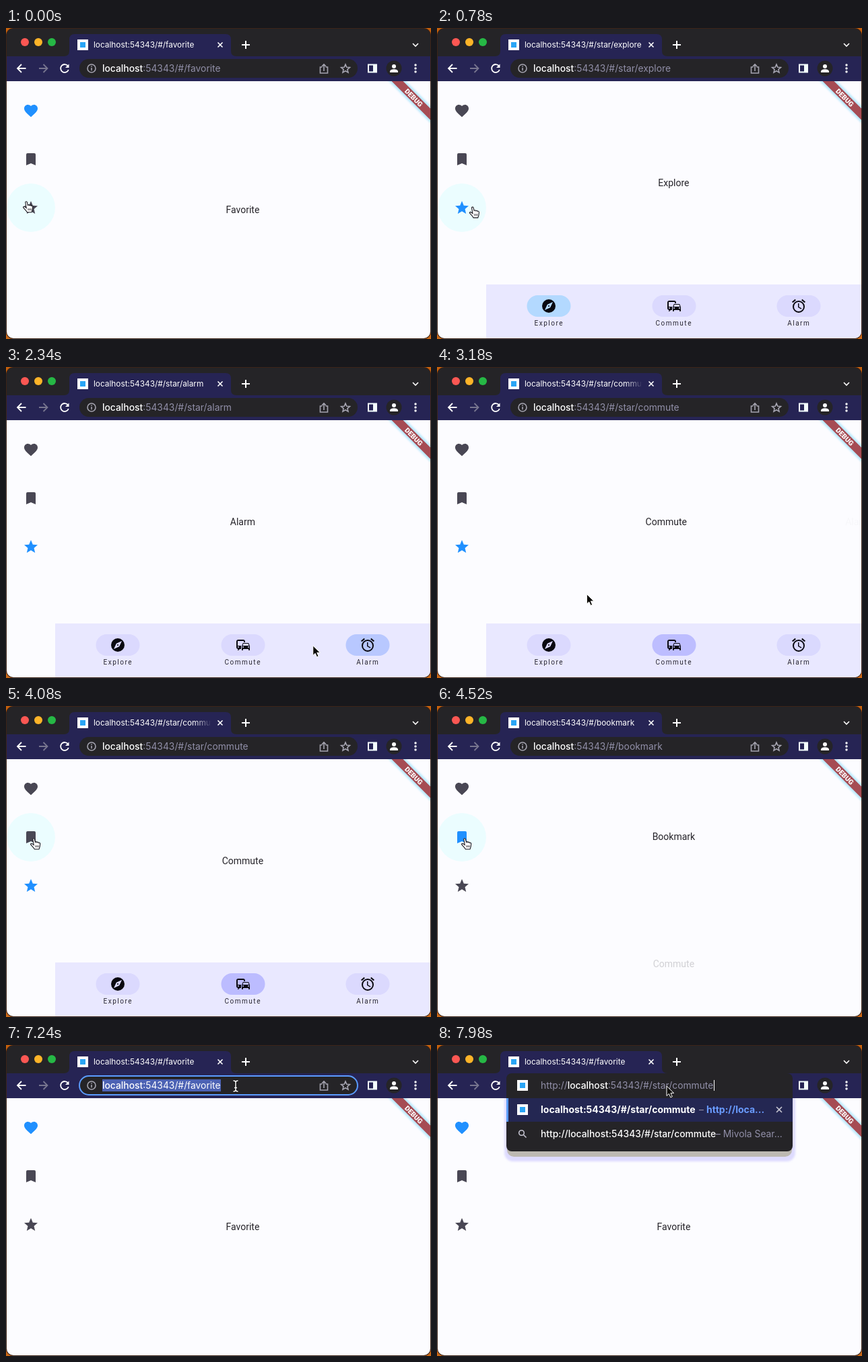
An HTML page for the animation above (8 s loop, 631 by 462 pixels).

```html
<!DOCTYPE html>
<html lang="en">
<head>
<meta charset="utf-8">
<title>Nested navigation</title>
<style>
  html, body { margin: 0; width: 100%; height: 100%; overflow: hidden; background: #252427; }
  svg { display: block; width: 100vw; height: 100vh; }
  text { white-space: pre; }
  .ui { font-family: Inter, "Open Sans", sans-serif; font-size: 13.85px; }
  .bold { font-size: 14px; font-weight: 700; }
  .mid { font-weight: 500; }
  .page { font: 14px Roboto, sans-serif; fill: #26242a; text-anchor: middle; }
  .label { font: 10px Roboto, sans-serif; letter-spacing: 1.5px; fill: #2a2832; }
  .line { fill: none; stroke-width: 1.6; }
  .dim { fill: #918fa8; }
  .hi { fill: #fff; }
</style>
</head>
<body>
<svg viewBox="0 0 631 462" preserveAspectRatio="none">
  <defs>
    <linearGradient id="desk" x2="0" y2="1">
      <stop offset="0" stop-color="#c4600c"/><stop offset=".5" stop-color="#7a3a10"/>
      <stop offset=".84" stop-color="#8a1414"/><stop offset="1" stop-color="#cc6a16"/>
    </linearGradient>
    <linearGradient id="fade">
      <stop offset="0" stop-color="#262454" stop-opacity="0"/><stop offset="1" stop-color="#262454"/>
    </linearGradient>
    <filter id="soft" x="-20%" y="-20%" width="140%" height="140%"><feGaussianBlur stdDeviation="1.8"/></filter>
    <clipPath id="win"><rect x="1" y="1" width="629" height="460" rx="10"/></clipPath>
    <clipPath id="content"><rect y="79" width="631" height="383"/></clipPath>
    <clipPath id="body"><rect x="73" y="79" width="557" height="382"/></clipPath>
    <clipPath id="titleClip"><rect x="126" y="12" width="179" height="26"/></clipPath>
    <g id="favicon"><rect width="16" height="16" fill="#fff"/><rect x="4" y="4" width="8" height="8" fill="#2aa5f5"/></g>
    <path id="beamShape" d="M-3.500-8Q0-8 0-5.500V5.500Q0 8-3.500 8M3.500-8Q0-8 0-5.500M3.500 8Q0 8 0 5.500M-2 2.500H2"/>
  </defs>

  <rect width="631" height="462" fill="url(#desk)"/>
  <rect width="631" height="462" rx="11" fill="#3b2216"/>
  <g clip-path="url(#win)">
    <rect width="631" height="80" fill="#252427"/>
    <path d="M86 42q8 0 8-8V17q0-8 8-8H326q8 0 8 8V34q0 8 8 8z" fill="#262454"/>
    <rect y="42" width="631" height="37" fill="#262454"/>
    <rect y="79" width="631" height="383" fill="#fcfcff"/>

    <circle cx="28" cy="21" r="6" fill="#fc5753"/>
    <circle cx="48" cy="21" r="6" fill="#fdb428"/>
    <circle cx="68" cy="21" r="6" fill="#26b845"/>
    <use href="#favicon" x="106" y="17"/>
    <g clip-path="url(#titleClip)">
      <text id="title" class="ui hi" x="130" y="29.3" style="font-size:11.85px"/>
      <rect id="titleFade" x="280" y="14" width="25" height="22" fill="url(#fade)"/>
    </g>
    <g class="line" stroke="#fff">
      <path d="M314.500 21.500l7 7m0-7l-7 7"/>
      <path d="M350 25h12M356 19v12" stroke-width="2"/>
      <path d="M604 23l4 4 4-4"/>
      <path d="M29.500 60H17.500M23 54l-6 6 6 6" stroke-width="1.8"/>
      <path d="M49 60h12M55.500 54l6 6-6 6" stroke="#77758f" stroke-width="1.8"/>
      <path d="M92 56.500A6 6 0 1 0 92.800 62" stroke-width="1.8"/>
    </g>
    <path d="M93.500 53.500v5.500h-5.500z" fill="#fff"/>

    <rect id="omnibox" x="109" y="46" width="413" height="28" rx="14" fill="#252427" stroke="#5b9cff" stroke-width="2"/>
    <g class="line" stroke="#a5a4b0" stroke-width="1.4">
      <circle cx="127" cy="60" r="6"/>
      <path d="M127 59v4.200M127 56.300v1.500"/>
      <path d="M469.500 58h-3v9h11v-9h-3M472 64V54M469 57l3-3 3 3"/>
      <path d="M504 54l1.800 4.200 4.600.4-3.500 3 1.100 4.500-4-2.400-4 2.400 1.100-4.500-3.500-3 4.600-.4z"/>
    </g>
    <rect id="selection" x="143" y="51" width="176" height="18" fill="#4c62b4"/>
    <text class="ui" x="143" y="65"><tspan class="hi mid">localhost</tspan><tspan id="path"/></text>

    <path d="M537 53.500h14v13h-14zM539 55.500v9h6v-9z" fill="#f4ffff" fill-rule="evenodd"/>
    <circle cx="576" cy="60" r="11.500" fill="#252427"/>
    <circle cx="576" cy="57" r="3" fill="#fff"/>
    <path d="M570 66v-1.500c0-4.500 12-4.500 12 0V66z" fill="#fff"/>
    <g fill="#fff"><circle cx="608" cy="55" r="1.700"/><circle cx="608" cy="60" r="1.700"/><circle cx="608" cy="65" r="1.700"/></g>

    <circle id="hover" cx="37" r="36" fill="#ebfdff"/>
    <circle id="ripple" cx="37" fill="#e2f0ff"/>
    <g id="rail"/>
    <g clip-path="url(#body)">
      <g id="nav"><rect x="73" y="381" width="558" height="81" fill="#e9e8ff"/></g>
      <text id="oldText" class="page"/>
      <text id="newText" class="page"/>
    </g>

    <g clip-path="url(#content)">
      <g transform="translate(605.500 103.500) rotate(45)">
        <rect x="-60" y="-9" width="120" height="18" fill="#b9e9ff" filter="url(#soft)"/>
        <rect x="-60" y="-6" width="120" height="12" fill="#a64c54"/>
        <text y="3.700" text-anchor="middle" fill="#fff" style="font:900 10.2px Roboto,sans-serif">DEBUG</text>
      </g>
    </g>

    <g id="suggest">
      <g clip-path="url(#content)">
        <rect x="100" y="70" width="432" height="103" rx="13" fill="#dedbff" filter="url(#soft)"/>
        <rect x="104" y="90" width="423" height="76" rx="10" fill="#bdb9b2"/>
      </g>
      <rect x="103" y="42" width="425" height="116" rx="8" fill="#252427"/>
      <rect x="103" y="79" width="425" height="35" fill="#242752"/>
      <rect x="103" y="79" width="3" height="35" fill="#5b9cff"/>
      <use href="#favicon" x="119" y="52"/>
      <use href="#favicon" x="119" y="88"/>
      <g class="line" stroke="#c4c3cf">
        <path d="M504 92l8 8m0-8l-8 8"/>
        <circle cx="125.500" cy="130.500" r="3.800"/><path d="M128.500 133.500l4 4"/>
      </g>
      <text class="ui dim" x="154" y="65">http://<tspan class="hi mid">localhost</tspan>:54343/#/star/commute</text>
      <rect x="411" y="52" width="1" height="16" fill="#fff"/>
      <text class="ui bold hi" x="154" y="101">localhost:54343/#/star/commute</text>
      <text class="ui dim" x="389" y="101">–</text>
      <text class="ui bold" x="400" y="101" fill="#6a9cff">http://loca...</text>
      <text class="ui mid hi" x="154" y="137">http://localhost:54343/#/star/commute</text>
      <text class="ui dim" x="414" y="137">– Mivola Sear...</text>
    </g>
  </g>

  <path id="arrow" d="M0 0V14.500L3.400 11.400 5.800 16.800 8.300 15.700 6 10.400H10.600z" fill="#0c0b08" stroke="#fff"/>
  <g id="hand" stroke="#1a1820">
    <path d="M-1.200 1C-1.200-.6 1.200-.6 1.400 1L2.400 5.200C3 4.200 4.800 4.500 5 5.600 5.800 4.800 7.200 5.200 7.400 6.300 8.400 5.700 9.800 6.400 9.700 7.800L9.200 12 8 15.800H1.400C0 12.800-2.800 10.800-4.400 8.600-4.600 7.200-2.600 6.800-1.400 8.200L.2 9.400z" fill="#fff" stroke-width="1.100"/>
    <path d="M3 10v3M5 10v3M7 10v3" stroke-width=".8"/>
  </g>
  <g id="beam" fill="none">
    <use href="#beamShape" stroke="#111" stroke-width="3.400"/>
    <use href="#beamShape" stroke="#fff" stroke-width="1.500"/>
  </g>
</svg>
<script>
const LOOP = 8000, SLIDE = 300, W = 558, H = 382, MID = 351.4;
const FOCUS = 6900, PASTE = 7700;
const $ = id => document.getElementById(id);
const clamp = (v, a = 0, b = 1) => Math.min(b, Math.max(a, v));
const set = (el, attrs) => { for (const k in attrs) el.setAttribute(k, attrs[k]); };
const show = (el, on) => { el.style.display = on ? '' : 'none'; };

function add(parent, tag, attrs) {
  const el = document.createElementNS('http://www.w3.org/2000/svg', tag);
  set(el, attrs);
  return parent.appendChild(el);
}

const railIcons = [
  'M12 21.35l-1.45-1.32C5.4 15.36 2 12.28 2 8.5 2 5.42 4.42 3 7.5 3c1.74 0 3.41.81 4.5 2.09C13.09 3.81 14.76 3 16.5 3 19.58 3 22 5.42 22 8.5c0 3.78-3.4 6.86-8.55 11.54z',
  'M17 3H7a2 2 0 0 0-2 2V21l7-3 7 3V5a2 2 0 0 0-2-2z',
  'M12 17.27L18.18 21l-1.64-7.03L22 9.24l-7.19-.61L12 2 9.19 8.63 2 9.24l5.46 4.73L5.82 21z'
];
const wheel = x => `M${x} 14a1 1 0 1 0 0 2a1 1 0 1 0 0-2z`;
const navItems = [
  { name: 'Explore', x: 166, label: 144.6, on: [179, 217, 255],
    icon: 'M12 10.9a1.1 1.1 0 1 0 0 2.2a1.1 1.1 0 1 0 0-2.2zM12 2a10 10 0 1 0 0 20a10 10 0 1 0 0-20zM14.19 14.19L6 18l3.81-8.19L18 6z' },
  { name: 'Commute', x: 352, label: 324.6, on: [188, 188, 255],
    icon: 'M13 8h2V7a3 3 0 0 0-3-3H5a3 3 0 0 0-3 3v8a3 3 0 0 0 3 3l-1 1v1h1l2-2h2v-5H4V6h9z' + wheel(5) +
      'M11.4 9.7a1 1 0 0 1 1-.7h7.2a1 1 0 0 1 1 .7L22 13.8v5.5a.7.7 0 0 1-.7.7h-.6a.7.7 0 0 1-.7-.7V18h-8v1.3a.7.7 0 0 1-.7.7h-.6a.7.7 0 0 1-.7-.7v-5.5zM12.4 10l-1 3h9.2l-1-3z' + wheel(12) + wheel(20) },
  { name: 'Alarm', x: 537, label: 520.2, on: [184, 200, 255],
    icon: 'M22 5.72l-4.6-3.86-1.29 1.53 4.6 3.86zM7.88 3.39L6.6 1.86 2 5.71l1.29 1.53zM12.5 8H11v6l4.75 2.85.75-1.23-4-2.37zM12 4a9 9 0 1 0 0 18a9 9 0 1 0 0-18zM12 6a7 7 0 1 1 0 14a7 7 0 1 1 0-14z' }
];
const pillOff = [219, 217, 254];

const railY = i => 123 + 72 * i;
const rail = railIcons.map((d, i) => add($('rail'), 'path', { d, transform: `translate(25 ${railY(i) - 12})` }));
const pills = navItems.map(item => {
  const pill = add($('nav'), 'rect', { x: item.x - 32.5, y: 397, width: 65, height: 32, rx: 16 });
  add($('nav'), 'path', { d: item.icon, 'fill-rule': 'evenodd', fill: '#0a0910', transform: `translate(${item.x - 12} 401)` });
  add($('nav'), 'text', { class: 'label', x: item.label, y: 442 }).textContent = item.name;
  return pill;
});

// Each route: rail tab and bottom tab
const routes = {
  favorite: { name: 'Favorite', tab: 0, sub: -1, url: 'favorite' },
  bookmark: { name: 'Bookmark', tab: 1, sub: -1, url: 'bookmark' },
  explore: { name: 'Explore', tab: 2, sub: 0, url: 'star/explore' },
  commute: { name: 'Commute', tab: 2, sub: 1, url: 'star/commute' },
  alarm: { name: 'Alarm', tab: 2, sub: 2, url: 'star/alarm' }
};
const visits = [
  [-9000, 'favorite'], [290, 'explore'], [1880, 'alarm'],
  [2887, 'commute'], [4281, 'bookmark'], [5453, 'favorite']
].map(([at, key]) => ({ at, ...routes[key] }));

const eases = { s: u => u * u * (3 - 2 * u), i: u => u * u, o: u => u * (2 - u) };
// time, x, y, easing towards this point
const moves = [
  [0, 30, 258], [620, 30, 258, 's'], [1250, 378, 382, 'i'], [1640, 506, 413, 'o'],
  [2150, 506, 413, 's'], [2650, 352, 416, 's'], [2935, 350, 414, 's'],
  [3180, 223, 338, 'i'], [3750, 41, 197, 'o'], [4700, 41, 197, 's'],
  [5200, 35, 135, 's'], [5900, 35, 135, 's'], [6700, 341, 61, 's'], [LOOP, 341, 61, 's']
];

function pointer(t) {
  const k = moves.findIndex((m, i) => i && t <= m[0]);
  const [t0, x0, y0] = moves[k - 1], [t1, x1, y1, e] = moves[k];
  const u = eases[e]((t - t0) / (t1 - t0));
  return [x0 + (x1 - x0) * u, y0 + (y1 - y0) * u];
}

function drawPages(now, prev, p) {
  const sameTab = prev.tab === now.tab;
  const dir = Math.sign(sameTab ? now.sub - prev.sub : now.tab - prev.tab);
  const place = (el, page, shift, opacity) => {
    el.textContent = page.name;
    set(el, {
      x: MID + (sameTab ? shift * W : 0),
      y: (page.tab === 2 ? 235 : 275) + (sameTab ? 0 : shift * H),
      opacity
    });
  };
  const inShift = dir * (1 - p), outShift = -dir * p / 2;
  place($('newText'), now, inShift, 1);
  place($('oldText'), prev, outShift, 1 - p);

  const entering = now.tab === 2, leaving = prev.tab === 2 && p < 1;
  show($('nav'), entering || leaving);
  const navShift = sameTab ? 0 : entering ? inShift : outShift;
  set($('nav'), { transform: `translate(0 ${navShift * H})`, opacity: entering ? 1 : 1 - p });
  pills.forEach((pill, i) => {
    let on = 0;
    if (entering) on = now.sub === i ? (sameTab ? p : 1) : sameTab && prev.sub === i ? 1 - p : 0;
    else if (prev.sub === i) on = 1;
    const rgb = pillOff.map((c, j) => Math.round(c + (navItems[i].on[j] - c) * on));
    pill.setAttribute('fill', `rgb(${rgb})`);
  });
}

function drawRail(t, x, y, now) {
  rail.forEach((icon, i) => icon.setAttribute('fill', i === now.tab ? '#2090ff' : '#494754'));
  const near = clamp(Math.round((y - 123) / 72), 0, 2);
  const glow = clamp((40 - Math.hypot(x - 37, y - railY(near))) / 8);
  set($('hover'), { cy: railY(near), opacity: glow });

  const click = visits.find((v, i) => i && v.tab !== visits[i - 1].tab && t > v.at - 80 && t < v.at + 240);
  show($('ripple'), click);
  if (click) set($('ripple'), {
    cy: railY(click.tab),
    r: 36 * clamp((t - click.at + 80) / 340),
    opacity: clamp((click.at + 240 - t) / 50)
  });
  return glow > 0;
}

function drawBar(t, now) {
  const focus = t >= FOCUS, pasted = t >= PASTE;
  const rest = ':54343/#/' + now.url;
  $('title').textContent = 'localhost' + rest;
  show($('titleFade'), $('title').getComputedTextLength() > 177);
  $('path').textContent = rest;
  $('path').setAttribute('class', focus ? 'hi' : 'dim');
  $('omnibox').setAttribute('stroke-opacity', focus ? 1 : 0);
  show($('selection'), focus);
  show($('suggest'), pasted);
}

function drawPointer(t, x, y, onRail) {
  const onNav = y > 395 && navItems.some(n => Math.abs(x - n.x) < 34);
  const onBar = y > 46 && y < 74 && x > 109 && x < 522 && t < PASTE;
  const kind = onBar ? 'beam' : onRail || onNav ? 'hand' : 'arrow';
  for (const id of ['arrow', 'hand', 'beam']) show($(id), id === kind);
  set($(kind), { transform: `translate(${x} ${y})` });
}

function render(t) {
  const k = visits.findLastIndex(v => t >= v.at);
  const now = visits[k], prev = visits[Math.max(0, k - 1)];
  const [x, y] = pointer(t);
  drawBar(t, now);
  drawPages(now, prev, clamp((t - now.at) / SLIDE));
  drawPointer(t, x, y, drawRail(t, x, y, now));
}

const start = performance.now();
function tick() {
  render((performance.now() - start) % LOOP);
  requestAnimationFrame(tick);
}
tick();
</script>
</body>
</html>
```
